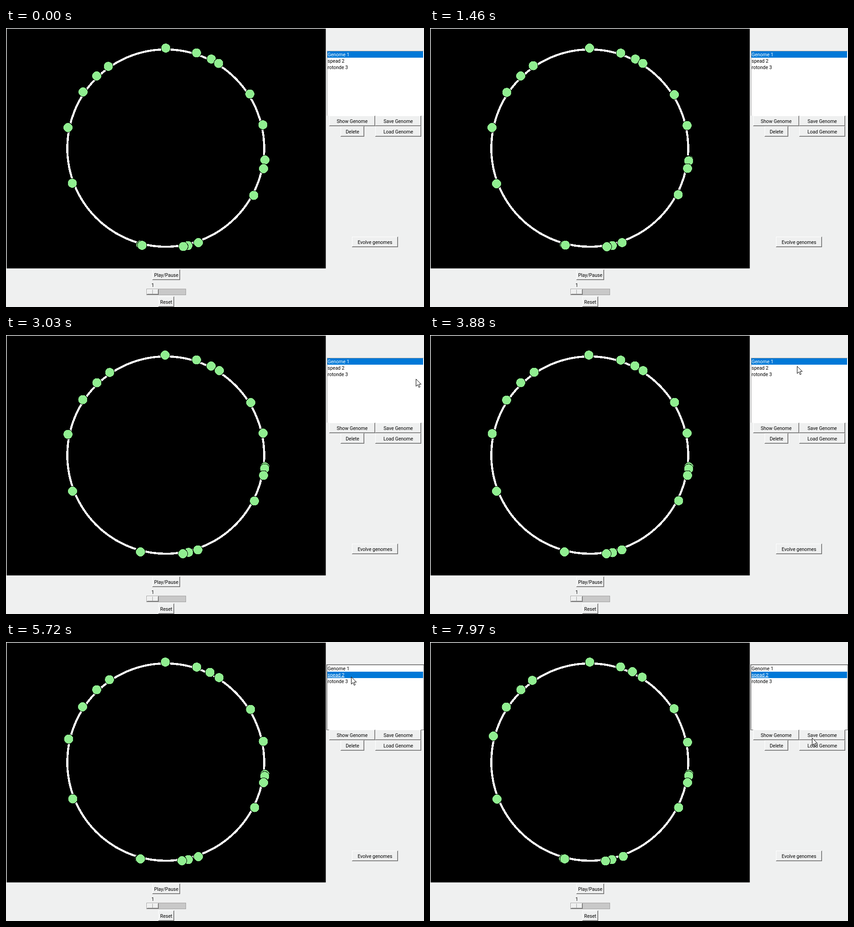
These frames come from a looping animation (917 by 611 pixels, 7.99 s). An HTML page:

```html
<!DOCTYPE html>
<html lang="en">
<head>
<meta charset="utf-8">
<title>Genome simulation</title>
<style>
html, body { margin: 0; width: 100%; height: 100%; overflow: hidden; background: #eff0f0; }
svg { display: block; width: 917px; height: 611px; }
text { font: 10.5px Roboto, "Open Sans", sans-serif; fill: #000; }
.mid { text-anchor: middle; }
</style>
</head>
<body>
<svg viewBox="0 0 917 611">
  <rect x="1.5" y="1.5" width="700" height="525"/>
  <g shape-rendering="crispEdges">
    <circle cx="350.5" cy="263" r="216" fill="none" stroke="#fff" stroke-width="4.5"/>
    <g id="dots" fill="#90ee90" stroke="#000"></g>
    <g id="panel"></g>
  </g>
  <path id="cursor" d="M.5 .5V16.3l3.7-3.5 2.6 6 2.5-1.1-2.6-5.8h5.1z" fill="#fff" stroke="#000"/>
</svg>
<script>
const LOOP = 7990, TICK = 30, SELECT_AT = 4950;
const CX = 350.5, CY = 263, ORBIT = 219, FACE = "#eff0f0";
const $ = id => document.getElementById(id);

function add(parent, tag, attrs, label) {
  const el = document.createElementNS("http://www.w3.org/2000/svg", tag);
  for (const k in attrs) el.setAttribute(k, attrs[k]);
  if (label) el.textContent = label;
  return parent.appendChild(el);
}
const panel = $("panel");
const box = (x, y, width, height, fill) => add(panel, "rect", { x, y, width, height, fill });

function raised(x, y, w, h) {
  box(x, y, w, h, "#696969");
  box(x, y, w - 1, h - 1, "#fff");
  box(x + 1, y + 1, w - 2, h - 2, "#a0a0a0");
  box(x + 1, y + 1, w - 3, h - 3, FACE);
}
function button(x, y, w, label) {
  raised(x, y, w, 23);
  add(panel, "text", { x: x + w / 2, y: y + 15.5, class: "mid" }, label);
}

// List box
const focusRing = box(703, 49, 214, 144, "#646464");
box(704, 50, 212, 142, "#a0a0a0");
box(705, 51, 211, 141, "#fff");
const bar = box(705, 51, 210, 14, "#0078d7");
const rows = ["Genome 1", "spead 2", "rotonde 3"].map((label, i) =>
  add(panel, "text", { x: 705.5, y: 61.5 + 14 * i }, label));

button(709, 192, 101, "Show Genome");
button(810, 192, 101, "Save Genome");
button(734, 215, 52, "Delete");
button(810, 215, 101, "Load Genome");
button(759, 457, 101, "Evolve genomes");
button(321, 529, 61, "Play/Pause");
button(334, 588, 35, "Reset");

// Speed slider
add(panel, "text", { x: 322, y: 566.5, class: "mid" }, "1");
box(308, 571, 87, 14, "#a0a0a0");
box(309, 572, 85, 12, "#c8c8c8");
raised(309, 572, 26, 12);
box(321, 573, 1, 10, "#a0a0a0");

// Walkers: start angle (degrees clockwise from the top), total drift and mid-loop sway (px along the ring)
const walkers = [
  [0, 0, -1.4], [18, 0, 0], [27.1, -7, 2.3], [32, -1, 2], [57.3, 1.5, 3.2],
  [76.5, 8, 0], [96.8, 1, 0], [96.8, 4, 2.7], [101.8, 0, 0], [118.2, -4.5, -2],
  [160.9, -2, 1.7], [167.2, 0, -1.6], [169.9, 4, 0], [194.4, 3, 1], [193.7, 3, 2.5],
  [249.4, -4, -0.5], [281.8, 12.5, -4], [304.1, -3, -0.5], [316.2, 0.5, 0], [324.9, 0, 4]
].map(([angle, drift, sway]) => ({
  angle: angle * Math.PI / 180, drift, sway, el: add($("dots"), "circle", { r: 10.5 })
}));

// Pointer stops: time, x, y
const stops = [
  [2700, 917, 104], [3030, 899, 96], [3300, 828, 68], [4780, 759, 67],
  [5720, 757, 76], [6950, 783, 231], [LOOP, 838, 210]
];

function drawWalkers(t) {
  const u = t / LOOP, arch = Math.sin(Math.PI * u);
  walkers.forEach(({ angle, drift, sway, el }, n) => {
    const jitter = 0.5 * arch * Math.sin(t / (70 + n * 7) + n * 2.4);
    const a = angle + (drift * u + sway * arch + jitter) / ORBIT;
    el.setAttribute("cx", Math.round(2 * (CX + ORBIT * Math.sin(a))) / 2);
    el.setAttribute("cy", Math.round(2 * (CY - ORBIT * Math.cos(a))) / 2);
  });
}

function drawList(chosen) {
  focusRing.setAttribute("fill", chosen ? "#646464" : FACE);
  bar.setAttribute("y", 51 + 14 * chosen);
  rows.forEach((row, n) => row.style.fill = n === chosen ? "#fff" : "#000");
  rows[1].style.textDecoration = chosen ? "underline" : "none";
}

function drawCursor(t) {
  const next = stops.findIndex(stop => stop[0] > t);
  $("cursor").style.display = next > 0 ? "" : "none";
  if (next < 1) return;
  const a = stops[next - 1], b = stops[next];
  const u = (t - a[0]) / (b[0] - a[0]), ease = u * u * (3 - 2 * u);
  const at = i => Math.round(a[i] + (b[i] - a[i]) * ease);
  $("cursor").setAttribute("transform", `translate(${at(1)} ${at(2)})`);
}

const start = performance.now();
function frame() {
  const time = (performance.now() - start) % LOOP;
  const t = Math.floor(time / TICK) * TICK;
  drawWalkers(t);
  drawList(time >= SELECT_AT ? 1 : 0);
  drawCursor(t);
  requestAnimationFrame(frame);
}
frame();
</script>
</body>
</html>
```
